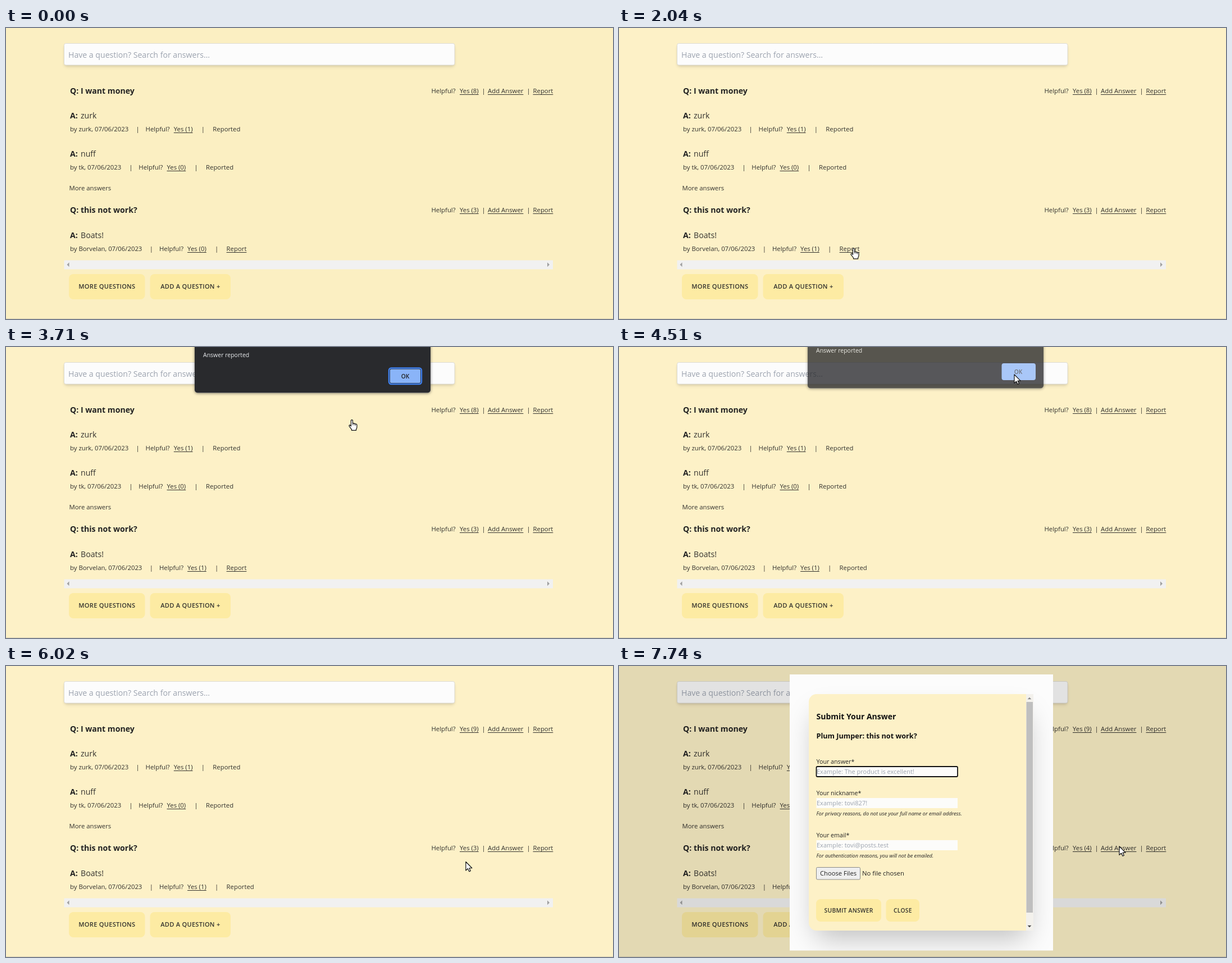
An HTML page with a canvas that plays this animation: 1081x518 px, repeating every 8000 ms.

```html
<!DOCTYPE html>
<html lang="en">
<head>
<meta charset="utf-8">
<title>Questions and answers</title>
<style>
  html, body { margin: 0; width: 100%; height: 100%; overflow: hidden; background: #fdf1c7; }
  canvas { display: block; }
</style>
</head>
<body>
<canvas id="stage" width="1081" height="518"></canvas>
<script>
const W = 1081, H = 518, LOOP = 8000, TICK = 66.25, START = 304;
const INK = '#33322e', BOLD = '#222', HINT = '#9ca3af', CREAM = '#fdf1c7', GOLD = '#fdeba3';
const stage = document.getElementById('stage').getContext('2d');
const layer = document.createElement('canvas');
layer.width = W;
layer.height = H;
const layerCtx = layer.getContext('2d');
let g = stage;

const clamp = (v) => Math.max(0, Math.min(1, v));
const mix = (a, b, u) => a + (b - a) * u;

// Pointer moves, in ticks: each eases out towards x, y and may end in a click.
// A free move shows the arrow, any other the hand.
const origin = { x: 868, y: 505 };
const moves = [
  { start: 0, end: 7, x: 342, y: 395, click: 13, free: true },
  { start: 20, end: 26, x: 418, y: 392, lift: 30, click: 40 },
  { start: 48, end: 54, x: 704, y: 49, lift: 25, click: 61 },
  { start: 63, end: 71, x: 827, y: 113, power: 1, click: 75, free: true },
  { start: 80, end: 83, x: 806, y: 378, power: 1 },
  { start: 83, end: 90, x: 827, y: 330, click: 91, free: true },
  { start: 98, end: 103, x: 891, y: 321 }
];
const [voteAnswer, report, accept, voteFirst, , voteSecond] = moves.map((m) => m.click);
const MODAL = 107;
const done = (n, click) => n >= click + 2;

const arrow = new Path2D('M0 0V15.4L3.5 12.1L6 17.3L8.4 16.2L6.1 11.2H11Z');
const hand = new Path2D('M-1.5 1Q0 -1 1.5 1V6.8Q3 5.4 4 7Q5.6 5.9 6.6 7.8Q8.4 7 9 9V13Q9 15 7.6 16.8V18.8H-.5V17L-4.7 11.6Q-5.4 9.2 -3.4 9.4L-1.5 11.4Z');

function text(str, x, y, size, { color = INK, weight = 400, italic = false, gap = 0, align = 'left' } = {}) {
  g.font = `${italic ? 'italic ' : ''}${weight} ${size}px "Open Sans", "Noto Sans", sans-serif`;
  g.letterSpacing = gap + 'px';
  g.textAlign = align;
  g.fillStyle = color;
  g.fillText(str, x, y);
  return g.measureText(str).width;
}

function box(x, y, w, h, r, fill, stroke, line = 1) {
  g.beginPath();
  g.roundRect(x, y, w, h, r);
  if (fill) {
    g.fillStyle = fill;
    g.fill();
  }
  if (stroke) {
    g.strokeStyle = stroke;
    g.lineWidth = line;
    g.stroke();
  }
}

// Soft shadow of a box shrunk by inset; the box itself is painted over it
function shadow(x, y, w, h, r, dy, blur, inset, alpha) {
  g.save();
  g.shadowColor = `rgba(0,0,0,${alpha})`;
  g.shadowBlur = blur;
  g.shadowOffsetY = dy;
  box(x + inset, y + inset, w - 2 * inset, h - 2 * inset, r, '#fff');
  g.restore();
}

function triangle(x, y, dx, dy, color) {
  g.beginPath();
  g.moveTo(x + dx, y + dy);
  g.lineTo(x - dx + 2 * dy, y - dy + 2 * dx);
  g.lineTo(x - dx - 2 * dy, y - dy - 2 * dx);
  g.fillStyle = color;
  g.fill();
}

const small = (str, x, y) => text(str, x, y, 11.35);

function link(str, x, y) {
  const w = small(str, x, y);
  g.fillRect(x, y + 2, w, 1);
}

function button(label, x, y, w, h, size) {
  const gap = 0.25;
  box(x, y, w, h, 8, GOLD);
  text(label, x + (w + gap) / 2, Math.round(y + h / 2 + size * 0.36), size, { weight: 600, gap, align: 'center' });
}

function question(str, y, votes) {
  text('Q: ' + str, 114, y, 14.1, { weight: 700, color: BOLD });
  y -= 1;
  small('Helpful?', 757.5, y);
  link(`Yes (${votes})`, 808, y);
  small('|', 847.5, y);
  link('Add Answer', 858, y);
  small('|', 927.5, y);
  link('Report', 938.5, y);
}

function answer(str, author, y, x, votes, reported) {
  text('A:', 114, y, 14.1, { weight: 700, color: BOLD });
  text(str, 133, y, 14.1);
  y += 23;
  small(`by ${author}, 07/06/2023`, 114, y);
  small('|', x - 2.5, y);
  small('Helpful?', x + 14.6, y);
  link(`Yes (${votes})`, x + 64.8, y);
  small('|', x + 113.8, y);
  (reported ? small : link)(reported ? 'Reported' : 'Report', x + 134.3, y);
}

function page(n) {
  g.fillStyle = n < 3 ? '#fbefc2' : CREAM;
  g.fillRect(0, 0, W, H);
  g.fillStyle = '#ddd5b6';
  g.fillRect(0, 517, W, 1);

  const search = [103.5, 27.5, 695.5, 38.5, 3];
  shadow(...search, 4, 6, 1, 0.1);
  shadow(...search, 2, 4, 1, 0.1);
  box(...search, '#fcfcfc', '#dedcd4');
  text('Have a question? Search for answers…', 111, 53, 14.1, { color: HINT });

  question('I want money', 117, done(n, voteFirst) ? 9 : 8);
  answer('zurk', 'zurk', 161, 234, 1, true);
  answer('nuff', 'tk', 229, 221.7, 0, true);
  small('More answers', 112.5, 289);
  question('this not work?', 329, done(n, voteSecond) ? 4 : 3);
  answer('Boats!', 'Borvelan', 374, 258.3, done(n, voteAnswer) ? 1 : 0, n > accept);

  g.fillStyle = '#f1f1f1';
  g.fillRect(103.5, 413.5, 870.5, 16);
  triangle(110.5, 421.3, -2, 0, '#a0a0a0');
  triangle(966, 421.3, 2, 0, '#a0a0a0');
  button('MORE QUESTIONS', 112, 438, 135.5, 45, 11.1);
  button('ADD A QUESTION +', 256.5, 438, 143.5, 45, 11.1);
}

// Draws a group on its own layer, then blends it as one
function fade(alpha, draw, shift, scale = 1) {
  g = layerCtx;
  g.clearRect(0, 0, W, H);
  draw();
  g = stage;
  g.save();
  g.globalAlpha = alpha;
  g.translate(W / 2, H / 2 + shift);
  g.scale(scale, scale);
  g.drawImage(layer, -W / 2, -H / 2);
  g.restore();
}

function alertBox(pressed) {
  shadow(336, -60, 420, 141.5, 5, 1, 5, 0, 0.5);
  box(336, -60, 420, 141.5, 5, '#292a2d');
  text('Answer reported', 351, 18, 10.5, { color: '#e8eaed' });
  if (pressed) {
    box(681.5, 37, 60.5, 30, 4, '#93b9f8');
  } else {
    box(682, 37.5, 58, 28.5, 4, null, '#3f80ee', 2.4);
    box(684, 39.5, 54, 24.5, 2, '#8ab4f8');
  }
  text('OK', 711, 55.5, 10.2, { color: pressed ? '#4a4d55' : '#202124', weight: 600, align: 'center' });
}

function field(label, hint, y, focused) {
  text(label, 351.5, y - 5, 10.7, { color: BOLD });
  box(351.5, y, 251.5, 18, focused ? 2 : 0, '#fcfcfa', focused && '#111', 1.8);
  text(hint, 352, y + 13, 11, { color: HINT });
}

function modal() {
  g.fillStyle = '#fcfcfc';
  g.fillRect(304, 15, 469, 491.5);
  g.save();
  g.beginPath();
  g.rect(304, 15, 469, 491.5);
  g.clip();
  shadow(338, 50, 400, 421, 14, 25, 50, 12, 0.25);
  box(338, 50, 400, 421, [14, 0, 0, 14], CREAM);
  g.restore();

  g.fillStyle = '#f3f1ec';
  g.fillRect(725, 50, 13, 421);
  g.fillStyle = '#bfbfbf';
  g.fillRect(725.5, 64, 11.5, 375);
  triangle(731, 57.5, 0, -1.7, '#8a8a8a');
  triangle(731, 463.5, 0, 1.7, '#444');

  const title = { weight: 700, color: '#111' };
  text('Submit Your Answer', 351.5, 95, 14, title);
  text('Plum Jumper: this not work?', 351.5, 129, 12.65, title);
  field('Your answer*', 'Example: The product is excellent!', 179, true);
  field('Your nickname*', 'Example: tovi827!', 235);
  field('Your email*', 'Example: tovi@posts.test', 310);
  const note = { italic: true, color: BOLD };
  text('For privacy reasons, do not use your full name or email address.', 351.5, 266, 9.2, note);
  text('For authentication reasons, you will not be emailed.', 351.5, 341, 9.2, note);
  box(351.5, 358.5, 78, 21.5, 2, '#efefef', '#8a8a86');
  text('Choose Files', 358, 373, 11.2, { color: BOLD });
  text('No file chosen', 433, 373, 11.3, { color: BOLD });
  button('SUBMIT ANSWER', 351, 415, 116, 40, 10.3);
  button('CLOSE', 475.5, 415, 59.5, 40, 10.3);
}

function pointer(n) {
  if (n < 0) return;
  let { x, y } = origin, shape = hand;
  for (const { start, end, lift = 0, power = 1.7, free, ...to } of moves) {
    if (n < start) break;
    const u = clamp((n - start) / (end - start)), e = 1 - (1 - u) ** power;
    x = mix(x, to.x, e);
    y = mix(y, to.y, e) - lift * 4 * u * (1 - u);
    shape = free && u < 1 ? arrow : hand;
  }
  if (n >= MODAL) shape = arrow;

  if (moves.some((m) => n >= m.click && !done(n, m.click))) {
    g.beginPath();
    g.arc(x, y, 11, 0, 7);
    g.fillStyle = 'rgba(255,255,0,.47)';
    g.fill();
  }
  g.save();
  g.translate(x, y);
  g.fillStyle = '#fff';
  g.fill(shape);
  g.strokeStyle = '#111';
  g.lineWidth = 1.2;
  g.lineJoin = 'round';
  g.stroke(shape);
  if (shape === hand) {
    g.fillStyle = '#111';
    for (let i = 0; i < 3; i++) g.fillRect(1.2 + i * 2.5, 6.8 + i * 0.6, 0.8, 2.6);
  }
  g.restore();
}

function frame() {
  const n = Math.floor((performance.now() % LOOP - START) / TICK);
  page(n);

  const enter = clamp((n - report - 1) / 4), leave = clamp((n - accept) / 5);
  if (enter > 0 && leave < 1) {
    fade(enter * (1 - leave ** 1.65), () => alertBox(n >= accept), -10 * (1 - enter) - 20 * leave);
  }

  if (n > MODAL) {
    g.fillStyle = 'rgba(0,0,0,.1)';
    g.fillRect(0, 0, W, H);
    const u = clamp((n - MODAL) / 5), e = u * u * (3 - 2 * u);
    fade(e, modal, 10 * (1 - e), mix(0.96, 1, e));
  }

  pointer(n);
  requestAnimationFrame(frame);
}
requestAnimationFrame(frame);
</script>
</body>
</html>
```
